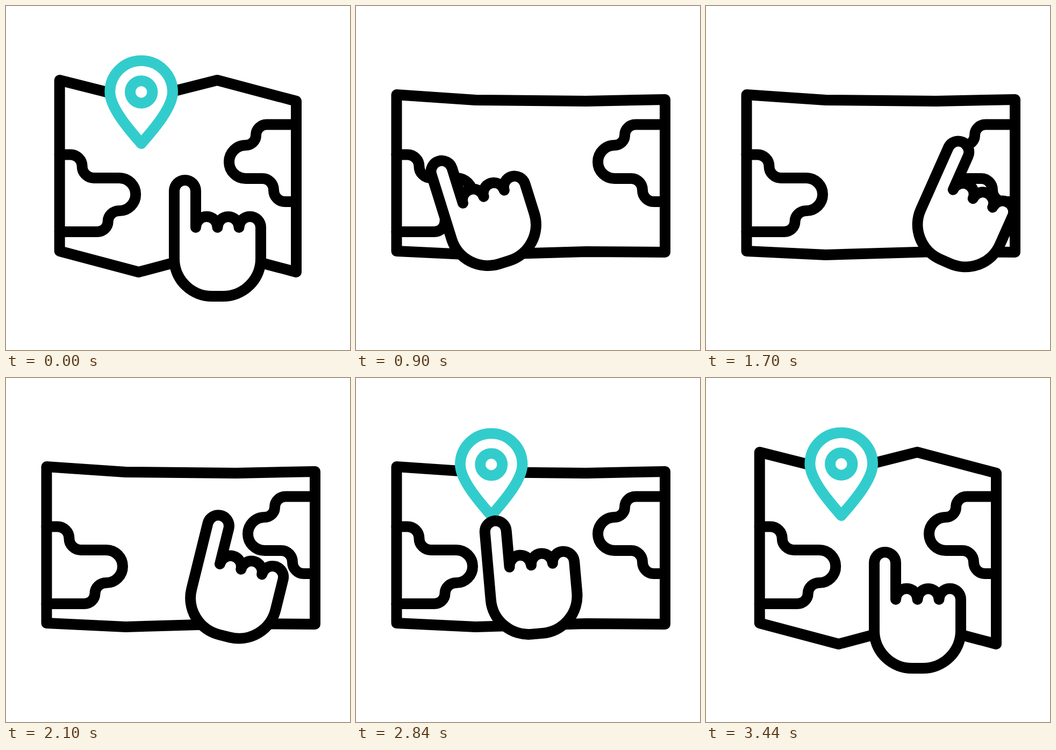
These frames come from a looping animation (640x640 px, 3.58 s). An HTML page:

```html
<!DOCTYPE html>
<html lang="en">
<head>
<meta charset="utf-8">
<title>Map gesture</title>
<style>
  html, body { margin: 0; width: 100%; height: 100%; overflow: hidden; background: #fff; }
  svg { display: block; width: 100%; height: 100%; }
  svg * { stroke-width: 20; stroke-linecap: round; stroke-linejoin: round; }
  .ink { fill: none; stroke: #000; }
  .solid { fill: #fff; stroke: #000; }
  .pin { fill: #fff; stroke: #3cc; }
</style>
</head>
<body>
<svg viewBox="0 0 640 640">
  <path id="sheet" class="ink"/>
  <path id="west" class="ink" d="M100 276.5h20a22 22 0 0 1 22 22a22 21.5 0 0 0 22 21.5h47a30.5 30.5 0 0 1 0 61a21 20 0 0 0-21 20a20 19 0 0 1-20 19H100"/>
  <path id="east" class="ink" d="M540 220.5h-55a20 20 0 0 0-20 20a19 18.5 0 0 1-19 18.5a31 31 0 0 0 0 62h31a21 21.5 0 0 1 21 21.5a21 21.5 0 0 0 21 21.5h21"/>
  <!-- pin: origin at its tip -->
  <g id="pin" class="pin">
    <path d="M0 0C-17-20-58.3-65-58.3-96a58.3 58.3 0 0 1 116.6 0C58.3-65 17-20 0 0Z"/>
    <circle cy="-96" r="20.7"/>
  </g>
  <!-- hand: origin at the middle of the palm -->
  <path id="hand" class="solid" d="M-40.5-58V-126a20 20 0 0 0-40 0V0a70.5 70 0 0 0 70.5 70h20a70.5 70 0 0 0 70.5-70V-58a20 20 0 0 0-40.5 0a20 20 0 0 0-40 0a20 20 0 0 0-40.5 0Z"/>
</svg>
<script>
  const LOOP = 3580;
  const PANEL = 147;
  const el = id => document.getElementById(id);
  const sheet = el('sheet'), west = el('west'), east = el('east'), pin = el('pin'), hand = el('hand');

  const phase = (t, from, to) => Math.min(1, Math.max(0, (t - from) / (to - from)));
  const smooth = x => x * x * (3 - 2 * x);
  const cubic = x => x < .5 ? 4 * x ** 3 : 1 - 4 * (1 - x) ** 3;
  const backIn = (x, pull) => x * x * ((pull + 1) * x - pull);

  // the outer panels slide apart while the folds level out
  function drawMap(t) {
    const p = cubic(phase(t, 180, 587)) - cubic(phase(t, 2960, 3420));
    const left = 99.7 - 24.2 * p, right = 540 + 35 * p;
    sheet.setAttribute('d', `M${left} ${138 + 27 * p}
      L${left + PANEL} 175 L${right - PANEL} ${138 + 39 * p} L${right} ${177 - 3 * p}
      V${495 - 37 * p} L${right - PANEL} ${456 + p} L${left + PANEL} ${495 - 32 * p} L${left} 456Z`);
    west.setAttribute('transform', `translate(${left - 100} 0)`);
    east.setAttribute('transform', `translate(${right - 540} 0)`);
  }

  // shrinks away with a lean, later pops back upright
  function drawPin(t) {
    const out = phase(t, 180, 628), back = phase(t, 2740, 3110);
    const leaving = t < 2740;
    const size = 1 - (leaving ? backIn(out, 1.7) : backIn(1 - back, 2.6));
    const turn = leaving ? -29 * out * out : 0;
    pin.style.display = size > .002 ? '' : 'none';
    pin.setAttribute('transform', `translate(251.7 256) rotate(${turn}) scale(${size})`);
  }

  // left, across in an arc, to the middle, home; the wrist leads the first move
  function drawHand(t) {
    const go = phase(t, 180, 810), across = phase(t, 810, 1860);
    const out = smooth(go ** 1.35), lean = smooth(go ** 1.2);
    const swing = smooth(across * (1 + .42 * (1 - across)));
    const arc = Math.sin(Math.PI * swing);
    const middle = smooth(phase(t, 1860, 2440)), home = smooth(phase(t, 2952, 3440));
    const x = 393.5 - 149 * out + 234.2 * swing + 8.5 * arc - 147.7 * middle + 62.5 * home;
    const y = 470 - 53.2 * out - 1.1 * swing - 54 * arc - 9.7 * middle + 64 * home;
    const turn = -19.1 * lean + 44.3 * swing - 30.2 * middle + 5 * home;
    hand.setAttribute('transform', `translate(${x} ${y}) rotate(${turn})`);
  }

  const start = performance.now();
  function draw() {
    const t = (performance.now() - start) % LOOP;
    drawMap(t);
    drawPin(t);
    drawHand(t);
    requestAnimationFrame(draw);
  }
  draw();
</script>
</body>
</html>
```
